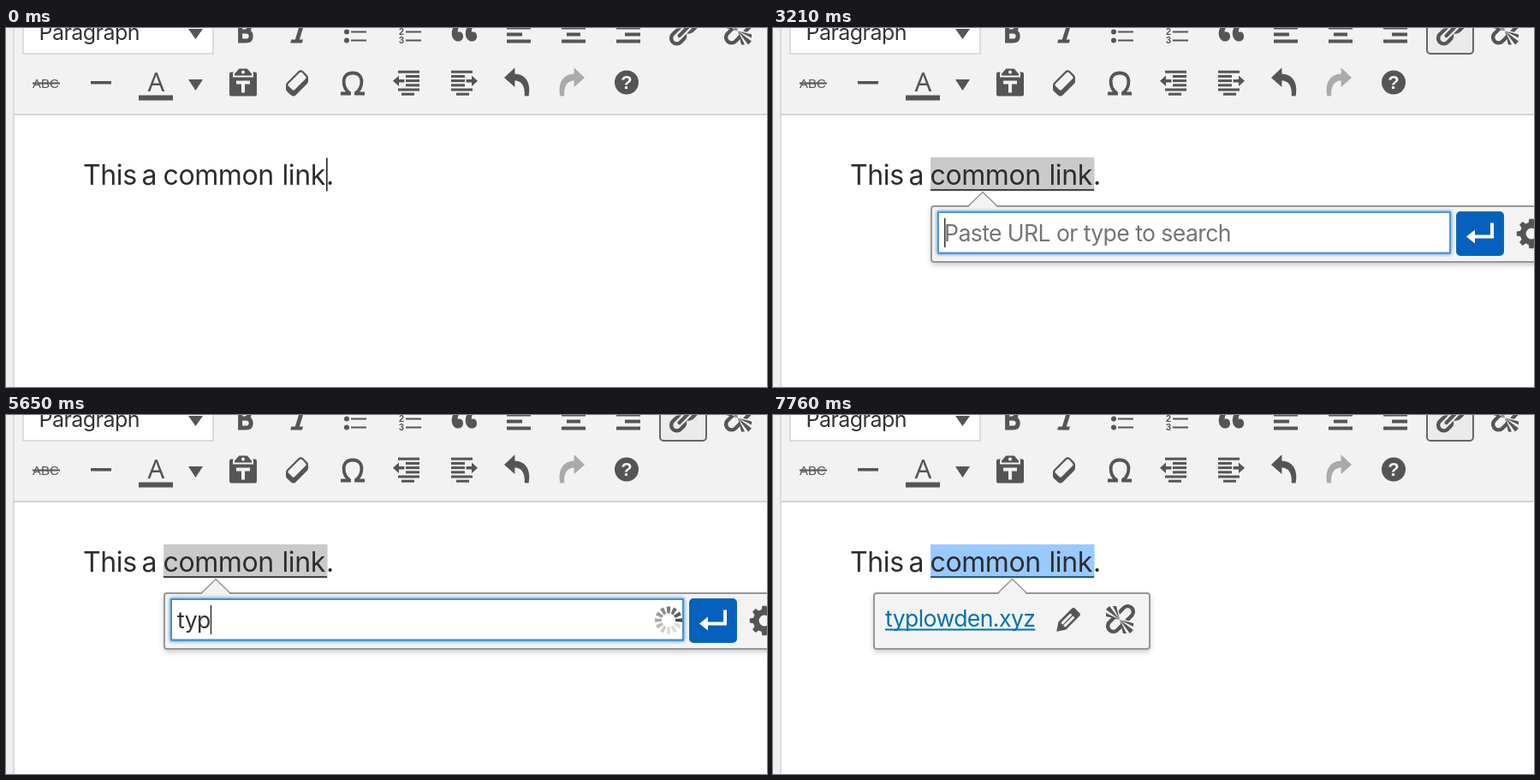
Write an HTML page with a canvas that moves like this. It is 889 by 419 pixels and loops after 8090 ms.

```html
<!DOCTYPE html>
<html lang="en">
<head>
<meta charset="utf-8">
<title>Inserting a link</title>
<style>
  html, body { margin: 0; width: 100%; height: 100%; overflow: hidden; background: #fff; }
  canvas { display: block; width: 889px; height: 419px; }
</style>
</head>
<body>
<canvas id="stage" width="889" height="419"></canvas>
<script>
const ctx = document.getElementById('stage').getContext('2d');
const LOOP = 8090;
const INK = '#555';
const UI = 'Inter, sans-serif';
const GLYPH = '"Liberation Sans", sans-serif';

function rect(x, y, w, h, color) {
  ctx.fillStyle = color;
  ctx.fillRect(x, y, w, h);
}

function poly(points, color) {
  ctx.fillStyle = color;
  ctx.beginPath();
  points.forEach(([x, y]) => ctx.lineTo(x, y));
  ctx.fill();
}

function disc(x, y, r, color) {
  ctx.fillStyle = color;
  ctx.beginPath();
  ctx.arc(x, y, r, 0, Math.PI * 2);
  ctx.fill();
}

function box(x, y, w, h, r, fill, border) {
  ctx.beginPath();
  ctx.roundRect(x, y, w, h, r);
  ctx.fillStyle = fill;
  ctx.fill();
  if (!border) return;
  ctx.strokeStyle = border;
  ctx.lineWidth = 2;
  ctx.stroke();
}

function text(str, x, y, font, color, align = 'left', spacing = 0) {
  ctx.font = font;
  ctx.fillStyle = color;
  ctx.textAlign = align;
  ctx.letterSpacing = spacing + 'px';
  ctx.fillText(str, x, y);
}

const uiText = (str, x, y, size, color, align) =>
  text(str, x, y, `${size}px ${UI}`, color, align, -0.022 * size);

function glow(color, blur, dy, draw) {
  ctx.save();
  ctx.shadowColor = color;
  ctx.shadowBlur = blur;
  ctx.shadowOffsetY = dy;
  draw();
  ctx.restore();
}

// Icons live on a 20-unit grid drawn at double size.
function icon(x, y, draw, color = INK) {
  ctx.save();
  ctx.translate(x, y);
  ctx.scale(2, 2);
  ctx.fillStyle = ctx.strokeStyle = color;
  draw();
  ctx.restore();
}

const shape = d => ctx.fill(new Path2D(d), 'evenodd');

function line(d, width) {
  ctx.lineWidth = width;
  ctx.stroke(new Path2D(d));
}

// Draws a shape and its copy turned by 180 degrees about (cx, cy).
function twice(d, cx, cy) {
  shape(d);
  ctx.save();
  ctx.translate(2 * cx, 2 * cy);
  ctx.scale(-1, -1);
  shape(d);
  ctx.restore();
}

function mirror() {
  ctx.translate(20, 0);
  ctx.scale(-1, 1);
}

function bold() {
  line('M7.3 5.2V15.8h3.2c2.2 0 3.1-1 3.1-2.8s-1-2.8-3.1-2.8H7.3h2.7c1.7 0 2.6-.8 2.6-2.5s-1-2.5-2.6-2.5z', 2.5);
}

function italic() {
  shape('M14.8 6h-2.1l-2.8 9H12l-.6 2H4.6l.6-2h2.2l2.8-9H8l.6-2h6.8z');
}

function bullets() {
  for (const y of [5.5, 10.5, 15.5]) {
    disc(5.5, y, 1.5, INK);
    ctx.fillRect(8, y - 0.5, 9, 1);
  }
}

function numbers() {
  [5.5, 10.5, 15.5].forEach((y, i) => {
    text(i + 1, 4, y + 1.9, `bold 5.4px ${GLYPH}`, INK);
    ctx.fillRect(8, y - 0.5, 9, 1);
  });
}

function quote() {
  const mark = 'M9.5 13.2c0-.7-.2-1.4-.6-1.9-.6-.8-1.8-.9-2.5-.7-.3-1.7 1.1-3.8 2.9-4.7L7.9 4c-2.7 1.3-5.4 4.3-5 8.1C3.2 14.4 4.6 16 6.5 16c1.8 0 3-1.1 3-2.8z';
  shape(mark);
  ctx.translate(8.05, 0);
  shape(mark);
}

const align = shortX => () => {
  for (let i = 0; i < 4; i++) {
    const long = i % 2;
    ctx.fillRect(long ? 3 : shortX, 3 + i * 4, long ? 14 : shortX === 6 ? 8 : 9, 2);
  }
};

function link() {
  twice('M17.74 2.76c1.68 1.69 1.68 4.41 0 6.1l-1.53 1.52c-1.12 1.12-2.7 1.47-4.14 1.09l4.14-4.14c.84-.84.84-2.2 0-3.04-.84-.85-2.2-.85-3.04 0L9.02 8.43c-.37-1.44-.02-3.02 1.1-4.14l1.52-1.53c1.69-1.68 4.42-1.68 6.1 0z', 10.5, 10);
  ctx.lineCap = 'round';
  line('M7.8 12.7L13.2 7.3', 2.1);
}

function unlink() {
  twice('M17.74 2.26c1.68 1.69 1.68 4.41 0 6.1l-1.53 1.52c-.32.33-.69.58-1.08.77L13 10l3.21-3.17c.84-.84.84-2.2 0-3.04-.84-.85-2.2-.85-3.04 0L10 7l-.65-2.14c.19-.38.44-.75.77-1.07l1.52-1.53c1.69-1.68 4.42-1.68 6.1 0z', 10.5, 9.5);
  twice('M2 4l8 6-6-8zM6 2l4 8-2-8zM2 6l8 4-8-2z', 10, 10);
}

function paste() {
  shape('M12.4 2L15 5v1H5V5l2.6-3zM10 5a1 1 0 0 0 0-2 1 1 0 0 0 0 2zM15.5 4H17a1 1 0 0 1 1 1v12a1 1 0 0 1-1 1H3a1 1 0 0 1-1-1V5a1 1 0 0 1 1-1h1.5L4 4.6V7h12V4.6zM14 11V9H6v2h3v5h2v-5z');
}

function eraser() {
  shape('M14.3 4.6l1.1 1.1c.4.4.6.9.6 1.5v2.1c0 .5-.2 1.1-.6 1.5l-6.6 6.6c-.8.8-2.1.8-2.9 0l-2.3-2.2c-.4-.4-.6-.9-.6-1.5v-2.1c0-.5.2-1.1.6-1.5l6.6-6.6c.8-.8 2.1-.8 2.9 0zM8.1 14.3l6.4-6.4c.4-.4.4-1 0-1.4L12.4 4.3c-.4-.4-1-.4-1.4 0L4.5 10.7c-.4.4-.4 1 0 1.4l2.2 2.2c.4.4 1 .4 1.4 0z');
}

function omega() {
  line('M3 16.5H8V16C5.8 14.6 4.8 12.3 4.8 9.4 4.8 6.3 6.8 4.5 10 4.5s5.2 1.8 5.2 4.9c0 2.9-1 5.2-3.2 6.6v.5H17', 1.9);
}

function outdent() {
  const rows = [[4.5, 17], [9, 17], [9, 17], [9, 17], [4.5, 17], [6.5, 14]];
  rows.forEach(([from, to], i) => ctx.fillRect(from, 3.1 + 2.6 * i, to - from, 1.5));
  shape('M1.5 9.1L5 6v2.2H8.2V10H5v2.2z');
}

function indent() {
  mirror();
  ctx.translate(0.5, 0);
  outdent();
}

const undo = () =>
  shape('M2.5 7.2L8.7 1.4V5C15 5.2 18.3 10.2 16.8 18L14.4 17.9C14.8 12.2 12.7 9.1 8.7 8.9V12.8z');

function redo() {
  mirror();
  undo();
}

function help() {
  disc(10, 10, 7, INK);
  text('?', 10, 13.9, `bold 11px ${GLYPH}`, '#f3f3f3', 'center');
}

const enter = () => shape('M16 4h2v9H7v3l-5-4 5-4v3h9z');

function gear() {
  ctx.translate(10, 10);
  for (let i = 0; i < 8; i++) {
    ctx.rotate(Math.PI / 4);
    shape('M-1.9-5L-1.3-8.6H1.3L1.9-5z');
  }
  ctx.lineWidth = 3.4;
  ctx.beginPath();
  ctx.arc(0, 0, 4.9, 0, Math.PI * 2);
  ctx.stroke();
}

function pencil() {
  shape('M13.9 3.4l2.7 2.7c.5.5.4 1.2 0 1.6l-8 8.1-5.5 1.1 1.1-5.6 8-8c.4-.4 1.2-.4 1.7.1zM11.2 6.2L5.6 11.8l1.1 1.1 5.5-5.6zM8.2 14.4l5.6-5.6-1.1-1.1-5.6 5.6z');
}

const TOP_ROW = [bold, italic, bullets, numbers, quote, align(3), align(6), align(8), link, unlink];
const LOWER_ROW = [[257, paste], [321, eraser], [385, omega], [449, outdent], [515, indent], [577, undo], [641, redo, '#aaa'], [705, help]];

function drawToolbar(linkPressed) {
  rect(0, 0, 889, 419, '#fff');
  rect(0, 0, 9, 419, '#efefef');
  rect(10, 0, 879, 100, '#f2f2f2');
  rect(8, 0, 2, 419, '#dcdcdc');
  rect(9, 100, 880, 2, '#d4d4d4');

  box(20, -20, 222, 50, 0, '#fff', '#dcdcdc');
  uiText('Paragraph', 38.5, 14, 25, '#333');
  poly([[213, 1], [230, 1], [221.5, 13]], INK);

  if (linkPressed) box(764, -12, 54, 42, 4, '#ebebeb', '#666');
  TOP_ROW.forEach((draw, i) => icon(259 + 64 * i, -16.5, draw));

  text('ABC', 31, 69.5, `15px ${GLYPH}`, INK);
  rect(31, 63.5, 32, 2, INK);
  rect(99, 62, 24, 3.5, INK);
  text('A', 175.5, 74, '500 31px "Noto Sans", sans-serif', INK, 'center');
  rect(155, 78.5, 40, 6, INK);
  poly([[213, 60], [230, 60], [221.5, 73]], INK);
  LOWER_ROW.forEach(([x, draw, color]) => icon(x, 43.5, draw, color));
}

function drawSentence(t) {
  const linked = t >= 1540, done = t >= 7760;
  if (t >= 650) {
    const x = t < 1100 ? 323 : 184;
    rect(x, 151, 375.5 - x, 39.5, linked && !done ? '#cacaca' : '#99c9ff');
  }
  const words = [['This', 90], ['a', 158.5], ['common', 183.5], ['link', 322.5], ['.', 374]];
  words.forEach(([word, x]) => text(word, x, 183, `32px ${UI}`, '#2d2d2d', 'left', -0.4));
  if (linked) rect(184, 188, 191, 2, done ? '#31587f' : '#444');
  if (t < 100) rect(374, 151.5, 1.6, 39, '#222');
}

function drawPopup(x, w, tip) {
  const fill = '#f3f3f3', border = '#979797';
  glow('rgba(0,0,0,.25)', 7, 3, () => box(x, 208, w, 65, 3, fill));
  box(x, 208, w, 65, 3, fill, border);
  poly([[tip - 17, 209.5], [tip, 192], [tip + 17, 209.5]], fill);
  ctx.strokeStyle = border;
  ctx.lineWidth = 1.6;
  ctx.beginPath();
  ctx.moveTo(tip - 17, 208);
  ctx.lineTo(tip, 191.5);
  ctx.lineTo(tip + 17, 208);
  ctx.stroke();
}

function drawSpinner(t) {
  const head = 11 + (t < 5320 ? 0 : Math.floor((t - 5320) / 110) + 1);
  ctx.save();
  ctx.translate(774, 239.5);
  for (let i = 0; i < 12; i++) {
    const age = (head - i + 24) % 12;
    const shade = Math.round(75 + 145 * Math.min(1, age / 9));
    ctx.save();
    ctx.rotate(i * Math.PI / 6);
    poly([[-1.6, -8], [-2.3, -16], [2.3, -16], [1.6, -8]], `rgb(${shade},${shade},${shade})`);
    ctx.restore();
  }
  ctx.restore();
}

function drawSuggestions(highlighted) {
  glow('rgba(40,130,210,.65)', 5, 2, () => box(193, 269, 598, 107, 0, '#fff', '#5492d3'));
  box(193, 269, 598, 107, 0, '#fff', '#5492d3');
  if (highlighted) rect(194, 270, 596, 52, '#d8d8d8');
  const rows = [['Typlowden', 'Common Link'], ['An Early Photo', 'Photograph']];
  rows.forEach(([title, kind], i) => {
    const y = 306 + 52 * i;
    uiText(title, 213.5, y, 25, '#444');
    uiText(kind, 770, y, 25, '#444', 'right');
  });
}

function drawLinkForm(t) {
  drawPopup(185, 760, 245);

  const border = t < 3210 ? '#a3cfd0' : t < 3320 ? '#4f96d2' : '#458fce';
  glow(border, 4, 0, () => box(193, 215, 598, 47.5, 0, '#fff', border));
  box(193, 215, 598, 47.5, 0, '#fff', border);

  box(799, 215, 54, 50, 4, '#0561bd', '#0a69a8');
  icon(806, 219.5, enter, '#fff');
  icon(866, 220, gear);

  const typed = t < 4100 ? '' : t < 4430 ? 't' : t < 4540 ? 'ty' : 'typ';
  uiText(typed || 'Paste URL or type to search', 200, 249, 26.6, typed ? '#333' : '#757575');
  const caretOn = t < 6760 || t >= 6870;
  const caretX = typed ? 200 + ctx.measureText(typed).width : 200;
  if (caretOn) rect(caretX, 222, 1.5, 34, '#333');

  if (t >= 4760 && t < 5870) drawSpinner(t);
  if (t >= 5870) drawSuggestions(t >= 6090);
}

function drawLinkPreview() {
  drawPopup(118, 322, 279.5);
  const url = 'typlowden.xyz';
  uiText(url, 131, 247, 26.6, '#0073aa');
  rect(131, 249.5, ctx.measureText(url).width, 2, '#0073aa');
  icon(325, 219, pencil);
  icon(385, 219, unlink);
}

function frame(now) {
  const t = now % LOOP;
  drawToolbar(t >= 1540);
  drawSentence(t);
  if (t >= 7760) drawLinkPreview();
  else if (t >= 1540) drawLinkForm(t);
}

const start = performance.now();
function tick() {
  frame(performance.now() - start);
  requestAnimationFrame(tick);
}
tick();
</script>
</body>
</html>
```
